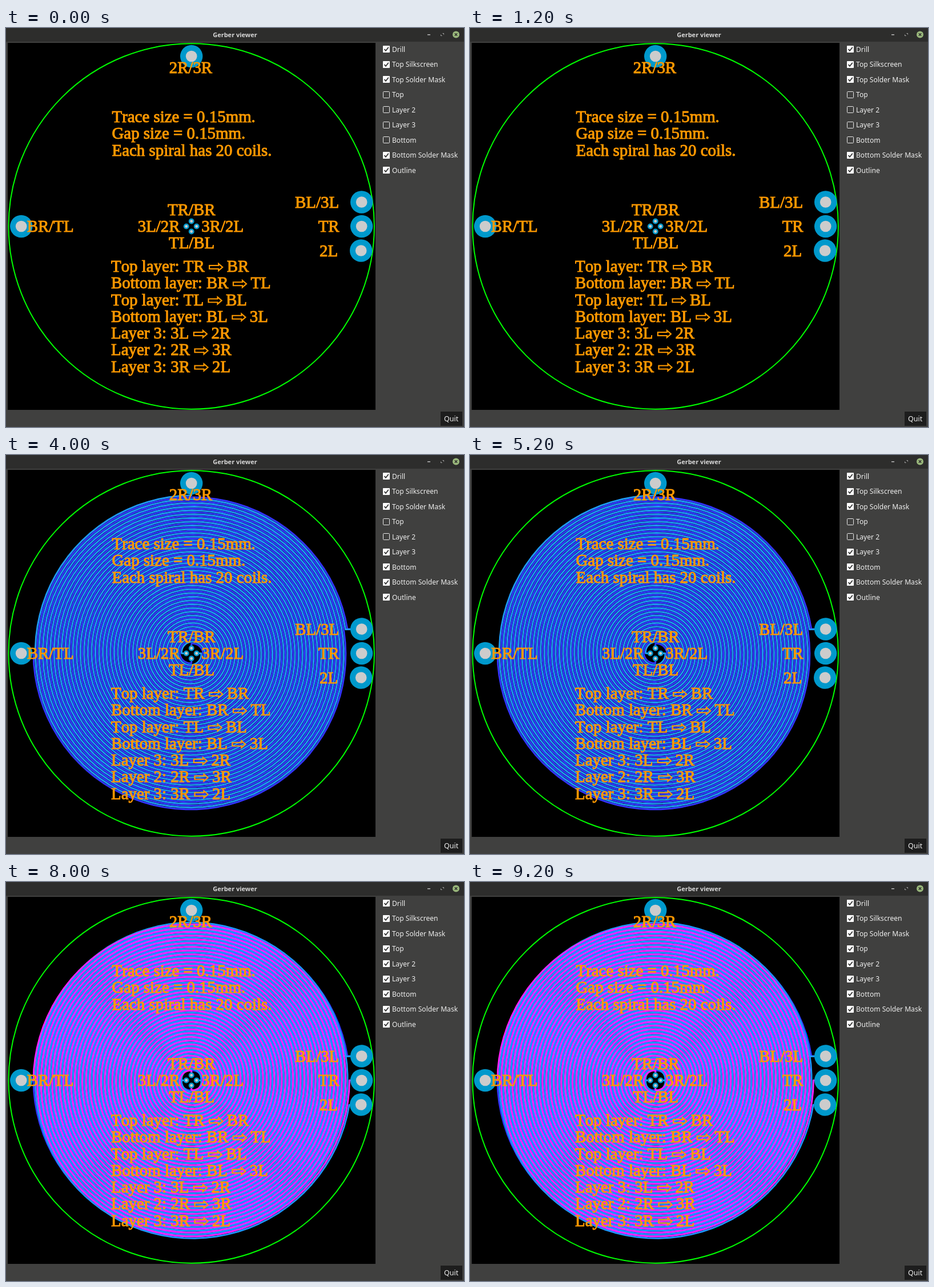
An HTML page that plays this animation: 802 by 699 pixels, repeating every 10000 ms.

```html
<!DOCTYPE html>
<html lang="en">
<head>
<meta charset="utf-8">
<title>Gerber viewer</title>
<style>
html, body { margin: 0; width: 100%; height: 100%; overflow: hidden; background: #40403f; }
svg { display: block; }
text { white-space: pre; }
.ui text { font: 12.1px "Noto Sans", sans-serif; fill: #eee; }
.ui .title { font-weight: bold; font-size: 11px; fill: #d6d6d6; text-anchor: middle; }
.silk text {
  font: 28.9px "Liberation Serif", "Times New Roman", serif; font-kerning: none;
  fill: #f90; stroke: #f90; stroke-width: 1;
}
.arrow { fill: none; stroke: #f90; stroke-width: 2.2; }
.copper path { fill: none; stroke-linejoin: round; }
</style>
</head>
<body>
<svg id="stage" width="802" height="699" viewBox="0 0 802 699"></svg>
<script>
const stage = document.getElementById('stage');
const TAU = 2 * Math.PI;
const CX = 324.7, CY = 347.5;      // board centre
const MM = 19.72;                  // pixels per millimetre
const R0 = .865 * MM, PITCH = 2 / 3 * MM, TRACE = .15 * MM;
const STEP = 2000, STEPS = 5;

function add(parent, tag, attrs = {}, text) {
  const el = document.createElementNS('http://www.w3.org/2000/svg', tag);
  for (const key in attrs) el.setAttribute(key, attrs[key]);
  if (text) el.textContent = text;
  parent.append(el);
  return el;
}
const group = (cls) => add(stage, 'g', { class: cls });
const rect = (g, x, y, width, height, fill) => add(g, 'rect', { x, y, width, height, fill });
const circle = (g, cx, cy, r, fill) => add(g, 'circle', { cx, cy, r, fill });
const label = (g, x, y, text, cls = '') => add(g, 'text', { x, y, class: cls }, text);

// Window frame
const ui = group('ui');
rect(ui, 0, 0, 802, 24, '#2d2d2c');
rect(ui, 3, 26, 644, 643, '#000');
label(ui, 401, 16, 'Gerber viewer', 'title');
rect(ui, 738, 11, 5, 1.5, '#bbb');
add(ui, 'path', { d: 'M764.5 9.5h2v2M763.5 13.5h-2v-2', fill: 'none', stroke: '#aaa' });
circle(ui, 788, 11.5, 6, '#9ab87c');
add(ui, 'path', { d: 'M785.8 9.3l4.4 4.4m0-4.4l-4.4 4.4', stroke: '#2d2d2c', 'stroke-width': 1.4 });
rect(ui, 761, 672, 38, 25, '#1d1d1d');
label(ui, 767, 689, 'Quit').style.fontSize = '12.5px';

// Pads
const REACH = 298;
const outer = {
  top: [CX, CY - REACH], left: [CX - REACH, CY], upper: [CX + REACH, CY - 42.5],
  right: [CX + REACH, CY], lower: [CX + REACH - 1, CY + 42.5]
};
const polar = (angle, r) => [CX + r * Math.cos(angle), CY + r * Math.sin(angle)];

// Spiral arm from an inner pad (quarter turns from east) to an outer pad; dir 1 is clockwise
function arm(g, quarter, dir, pad, stroke) {
  const start = quarter * TAU / 4;
  const dx = Math.sign(pad[0] - CX) * 273;
  const rim = Math.atan2(pad[1] - CY, dx);
  const part = ((dir * (rim - start) / TAU) % 1 + 1) % 1;
  const turns = 19 + part;
  const points = [polar(start, 9)];
  const n = Math.round(turns * 90);
  for (let i = 0; i <= n; i++) {
    const t = turns * i / n;
    points.push(polar(start + dir * t * TAU, R0 + PITCH * t));
  }
  points.push(pad);
  const d = 'M' + points.map(p => p.map(v => v.toFixed(2))).join('L');
  add(g, 'path', { d, stroke, 'stroke-width': TRACE });
}

function copper(dir, stroke, ...arms) {
  const g = group('copper');
  for (const [quarter, pad] of arms) arm(g, quarter, dir, outer[pad], stroke);
  return g;
}
const layers = [
  copper(1, '#33f', [3, 'left'], [1, 'upper']),
  copper(1, '#1e98f4', [0, 'top'], [2, 'upper']),
  copper(-1, '#1e94ff', [2, 'top'], [0, 'lower']),
  copper(-1, '#ff24ff', [3, 'right'], [1, 'left'])
];

// Outline, solder mask and silkscreen
const board = group('silk');
add(board, 'circle', { cx: CX, cy: CY, r: 320.2, fill: 'none', stroke: '#0f0', 'stroke-width': 2 });
const pads = Object.values(outer).map(p => [...p, MM, MM / 2]);
for (let q = 0; q < 4; q++) pads.push([...polar(q * TAU / 4, 9), MM / 4, MM / 8]);
for (const [x, y, r] of pads) circle(board, x, y, r, '#09c');

[
  [285.7, 79, '2R/3R'], [36.7, 357, 'BR/TL'], [506, 314.5, 'BL/3L'],
  [546.7, 357, 'TR'], [549, 399.5, '2L'], [283, 328, 'TR/BR'],
  [230.7, 357, '3L/2R'], [342.3, 357, '3R/2L'], [285, 386, 'TL/BL'],
  [185.5, 165, 'Trace size = 0.15mm.'], [185.5, 194.3, 'Gap size = 0.15mm.'],
  [185.5, 223.5, 'Each spiral has 20 coils.']
].forEach(args => label(board, ...args));

[
  ['Top layer: TR', 'BR'], ['Bottom layer: BR', 'TL'], ['Top layer: TL', 'BL'],
  ['Bottom layer: BL', '3L'], ['Layer 3: 3L', '2R'], ['Layer 2: 2R', '3R'],
  ['Layer 3: 3R', '2L']
].forEach(([from, to], i) => {
  const y = 427 + i * 29.25;
  const x = 184 + label(board, 184, y, from).getComputedTextLength() + 8.5;
  add(board, 'path', { class: 'arrow', d: `M${x} ${y - 11}h16v-3l7 6l-7 6v-3h-16z` });
  label(board, x + 30.5, y, to);
});
for (const [x, y, , r] of pads) circle(board, x, y, r, '#ccc');

// Check boxes; a number is the step at which the layer is switched on
const ticks = [];
[
  ['Drill', 0], ['Top Silkscreen', 0], ['Top Solder Mask', 0], ['Top', 4], ['Layer 2', 3],
  ['Layer 3', 2], ['Bottom', 1], ['Bottom Solder Mask', 0], ['Outline', 0]
].forEach(([name, from], i) => {
  const y = 37 + i * 26.55;
  const top = Math.round(y - 6);
  add(ui, 'rect', { x: 660.5, y: top + .5, width: 11, height: 11, rx: 1, fill: 'none', stroke: '#e8e8e8' });
  const tick = add(ui, 'g');
  add(tick, 'rect', { x: 660, y: top, width: 12, height: 12, rx: 1, fill: '#fff' });
  add(tick, 'path', { d: `M662.5 ${top + 6}l2.5 2.8l4.8 -6`, fill: 'none', stroke: '#333', 'stroke-width': 1.8 });
  ticks.push([tick, from]);
  label(ui, 676, y + 4.6, name);
});

const show = (el, on) => { el.style.display = on ? '' : 'none'; };
let shown = -1;
function frame() {
  const step = Math.floor(performance.now() / STEP) % STEPS;
  if (step !== shown) {
    shown = step;
    layers.forEach((layer, i) => show(layer, step > i));
    ticks.forEach(([tick, from]) => show(tick, step >= from));
  }
  requestAnimationFrame(frame);
}
frame();
</script>
</body>
</html>
```
